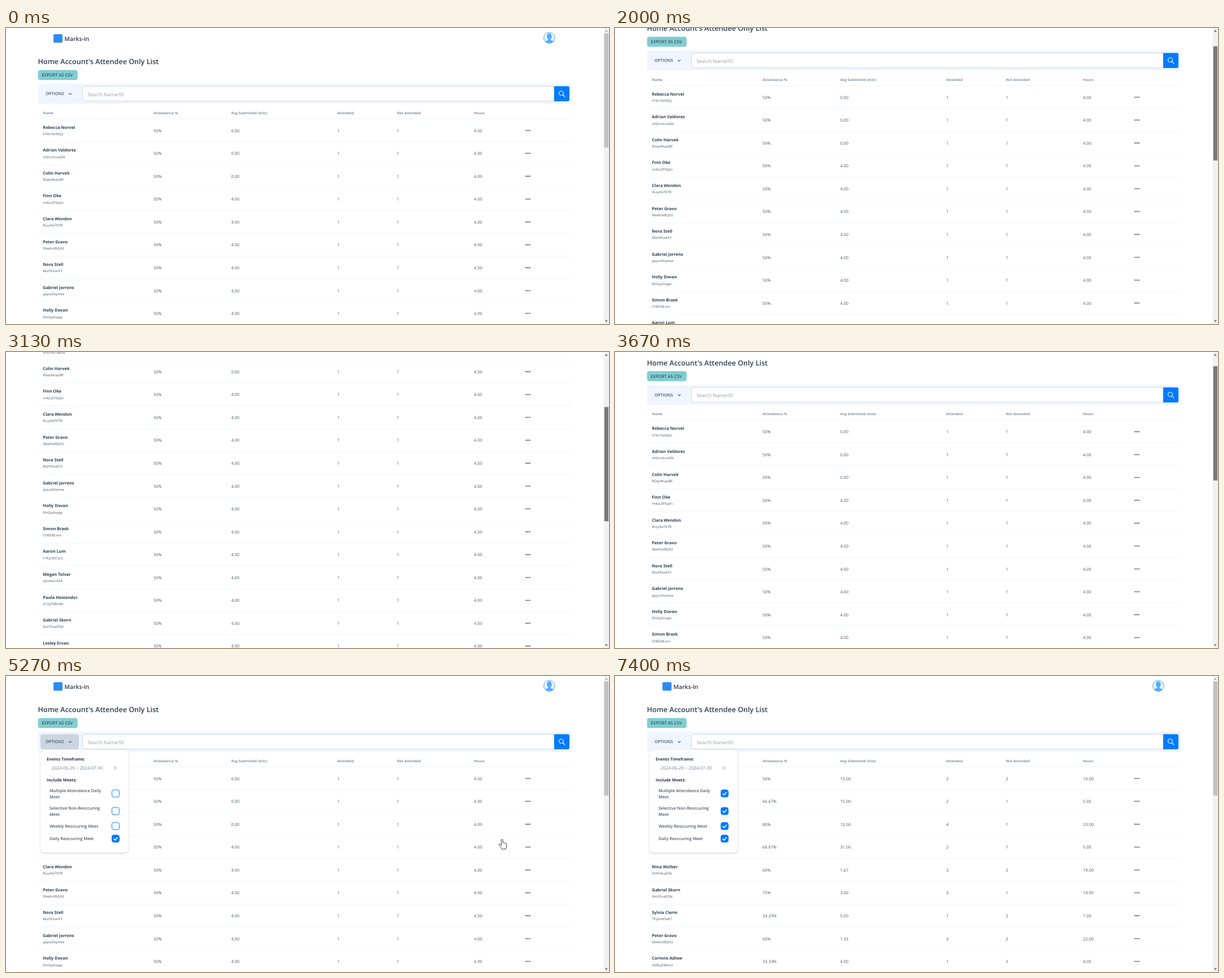
Animation of 1067x525 px, one loop 8 s. Source, as an HTML page:

```html
<!DOCTYPE html>
<html lang="en">
<head>
<meta charset="utf-8">
<title>Attendee list</title>
<style>
  html, body { margin: 0; width: 100%; height: 100%; overflow: hidden; background: #fff; }
  svg { display: block; width: 1067px; height: 525px; }
  text { font-family: "Open Sans", "Noto Sans", sans-serif; text-rendering: geometricPrecision; white-space: pre; }
  .brand { font-size: 10.3px; font-weight: 600; fill: #2d3748; }
  .title { font-size: 12.6px; font-weight: 600; fill: #2d3f55; }
  .export { font-size: 7.6px; font-weight: 500; fill: #1a2b3c; }
  .options { font-size: 7.4px; font-weight: 600; fill: #4a5568; }
  .search { font-size: 8.55px; fill: #959ba3; }
  .head { font-size: 6.25px; font-weight: 700; fill: #8492a6; }
  .name { font-size: 7.4px; font-weight: 700; fill: #2d3f55; }
  .id { font-size: 6px; fill: #4a5568; }
  .cell { font-size: 7.4px; fill: #4a5568; }
  .section { font-size: 7.3px; font-weight: 700; fill: #2d3748; }
  .date { font-size: 7.9px; fill: #718096; }
  .label { font-size: 7.3px; font-weight: 600; fill: #4a5568; }
  #panel > rect { filter: drop-shadow(0 1px 1.5px rgba(0, 0, 0, .22)); }
</style>
</head>
<body>
<svg viewBox="0 0 1067 525">
  <g id="page">
    <rect x="84" y="11" width="16" height="15" rx="2" fill="#2c8cf4"/>
    <text class="brand" x="103.6" y="22.7">Marks-In</text>
    <g id="avatar">
      <clipPath id="disc"><circle cx="961.4" cy="17.5" r="9.6"/></clipPath>
      <circle cx="961.4" cy="17.5" r="9.8" fill="#eaf4ff" stroke="#4da3fb"/>
      <path clip-path="url(#disc)" fill="#58abff" d="M957 14.5a4.4 5.2 0 0 1 8.8 0c0 2.6-1 4.2-2.2 5.2v1.5c2 1.2 5 1.5 6.4 3.6V29h-17.2v-4.2c1.4-2.1 4.4-2.4 6.4-3.6v-1.5c-1.2-1-2.2-2.6-2.2-5.2z"/>
    </g>
    <text class="title" x="56.6" y="64.4">Home Account's Attendee Only List</text>
    <rect x="56.7" y="74.4" width="70" height="17.8" rx="4" fill="#81cdd1"/>
    <text class="export" x="63.6" y="86.1">EXPORT AS CSV</text>
    <rect x="56.7" y="98.8" width="944.5" height="35.6" rx="4" fill="#f0f5ff"/>
    <rect id="hover" x="61" y="103.3" width="68" height="26.7" rx="4" fill="#cbd5e0"/>
    <text class="options" x="70" y="119.4">OPTIONS</text>
    <path d="M111.2 115.6l2.4 2.4 2.4-2.4" fill="none" stroke="#4a5568" stroke-width="1.1"/>
    <path d="M970.5 103.5H139.4a4 4 0 0 0-4 4v18a4 4 0 0 0 4 4H970.5z" fill="#fff" stroke="#cfd8e3"/>
    <text class="search" x="144.2" y="120.6">Search Name/ID</text>
    <path d="M970 103.2h24a3 3 0 0 1 3 3v20.8a3 3 0 0 1-3 3h-24z" fill="#007bff"/>
    <g fill="none" stroke="#fff" stroke-width="1.1" stroke-linecap="round">
      <circle cx="982.4" cy="115.6" r="3.9"/><path d="M985.3 118.5l3.5 3.5"/>
    </g>
    <g id="table"></g>
    <g id="panel">
      <rect x="61" y="131" width="155.8" height="182.6" rx="7" fill="#fff"/>
      <text class="section" x="72" y="149.6">Events Timeframe:</text>
      <text class="date" x="80.4" y="166.3">2024-06-29 ~ 2024-07-30</text>
      <path d="M190.6 160.4l5.6 5.6m0-5.6l-5.6 5.6" stroke="#718096" stroke-width=".7"/>
      <text class="section" x="72" y="187.2">Include Meets:</text>
      <g id="meets"></g>
    </g>
  </g>
  <rect x="1057.6" width="9.4" height="525" fill="#f1f1f1"/>
  <path id="up" d="M1060 6.4l2.3-2.8 2.3 2.8z"/>
  <path d="M1060 518.7l2.3 2.8 2.3-2.8z" fill="#505050"/>
  <rect id="thumb" x="1058.7" width="7.3" height="202.6"/>
  <g id="cursor" stroke="#222" stroke-width=".9" fill="#fff" stroke-linejoin="round">
    <path id="hand" d="M-1.6 1.2a1.4 1.4 0 0 1 2.8 0V6c.5-.8 2.2-.6 2.4.5.6-.7 2-.4 2.2.6.7-.5 1.9 0 1.9 1.2v4.2c0 1.9-1.3 2.6-1.3 4.5H-.8c0-1.7-1.7-2.6-2.6-4.3L-5.7 9.5c-.6-1.4.9-2.2 2-1.2l2.1 2z"/>
    <path id="arrow" d="M0 0v13.5l3.1-2.9 2.1 4.9 2.1-.9-2.1-4.8h4.2z"/>
  </g>
</svg>
<script>
const LOOP = 8000, TICK = LOOP / 120, ROW = 40.56;
const COLUMNS = [261, 398.4, 586, 691.5, 828];
const HEADINGS = ['Attendance %', 'Avg Submitted (min)', 'Attended', 'Not Attended', 'Hours'];

const people = `Rebecca Norvel,kT4n7w36QL
Adrian Valdorez,xH2cmLUaGN
Colin Harvek,RGeyWuqd8f
Finn Oke,m42vZP3q5n
Clara Wendon,4LuyheTR7B
Peter Gravo,9bwKsV8QH2
Nora Stell,B6zFKSodY3
Gabriel Jorrens,ppyuGXqmee
Holly Dovan,EhtGydnqqe
Simon Brask,ChBZ4JLvvo
Aaron Lum,Y7R2VDTSLK
Megan Tolvar,ypLwecnFe4
Paula Hestandor,d72yP9BsMh
Gabriel Skorn,Kxo55uaDQe
Lesley Ervan,zW8tq3LbHc
Nina Wolber,VnXh4uaZGk
Sylvia Clerm,TPyDnK5eR7
Corinne Adlow,hDRsyhR6m2`.split('\n').map(line => line.split(','));

// Table contents after each filter change: people order and cell values.
const stages = [
  { at: 0, order: people.map((_, i) => i),
    cells: people.map((_, i) => `50% ${i < 3 ? '0.00' : '4.00'} 1 1 4.00`) },
  { at: 6130, order: [0, 1, 2, 3, 13, 15, 5, 16, 8],
    cells: ['50% 15.00 1 1 5.00', '50% 15.00 1 1 4.00', '66.67% 15.50 2 1 9.00', '50% 31.00 1 1 4.00',
      '66.67% 3.00 2 1 8.00', '50% 1.67 1 1 5.00', '66.67% 1.33 2 1 8.00', '50% 5.00 1 1 1.00', '50% 4.00 1 1 4.00'] },
  { at: 6660, order: [0, 1, 2, 3, 13, 15, 5, 16, 8],
    cells: ['50% 15.00 2 2 10.00', '66.67% 15.00 2 1 5.00', '75% 15.50 3 1 18.00', '66.67% 31.00 2 1 5.00',
      '66.67% 3.00 2 1 9.00', '66.67% 1.67 2 1 14.00', '66.67% 1.33 2 1 17.00', '50% 5.00 1 1 1.00', '50% 4.00 1 1 4.00'] },
  { at: 7330, order: [0, 1, 2, 3, 15, 13, 16, 5, 17],
    cells: ['50% 15.00 2 2 10.00', '66.67% 15.00 2 1 5.00', '80% 15.50 4 1 23.00', '66.67% 31.00 2 1 5.00',
      '60% 1.67 3 2 19.00', '75% 3.00 3 1 14.00', '33.33% 5.00 1 2 1.00', '60% 1.33 3 2 22.00', '33.33% 4.00 1 2 4.00'] }
];

const meets = [
  { y: 208.3, lines: ['Multiple Attendance Daily', 'Meet'], checkedAt: 6000 },
  { y: 239.5, lines: ['Selective Non-Reoccuring', 'Meet'], checkedAt: 6530 },
  { y: 266.2, lines: ['Weekly Reoccuring Meet'], checkedAt: 7200 },
  { y: 288.4, lines: ['Daily Reoccuring Meet'], checkedAt: 0 }
];

// Keyframes: time, value
const scrollKeys = [[1470, 0], [1600, 4], [1670, 9], [2400, 119.6], [3130, 228], [3200, 231], [3670, 40.4], [3800, 6], [3870, 0]];
const hoverKeys = [[4870, 0], [5000, 1], [5300, 1], [5470, 0]];
const panelKeys = [[5000, 0], [5130, 1]];
const cursorX = [[4600, 1038], [4870, 925], [5130, 878], [5300, 878], [5670, 1000], [6070, 1000], [6330, 1004], [7200, 1004], [7400, 1075]];
const cursorY = [[4600, 498], [4870, 345], [5130, 290], [5300, 290], [5670, 415], [6070, 415], [6330, 458], [6600, 458], [6930, 501], [7200, 501], [7400, 505]];

const $ = id => document.getElementById(id);
const text = (cls, x, y, value) => `<text class="${cls}" x="${x}" y="${y}">${value}</text>`;
const within = (t, ...spans) => spans.some(([from, to]) => t >= from && t < to);

function sample(keys, t) {
  const next = keys.findIndex(key => key[0] > t);
  if (next === 0) return keys[0][1];
  if (next < 0) return keys[keys.length - 1][1];
  const [t0, a] = keys[next - 1], [t1, b] = keys[next];
  return a + (b - a) * (t - t0) / (t1 - t0);
}

function rowMarkup(stage, i) {
  const [name, id] = people[stage.order[i]], y = 161.3 + i * ROW;
  const cells = stage.cells[i].split(' ').map((value, c) => text('cell', COLUMNS[c], y + 23.3, value));
  const dots = [920.3, 923.5, 926.7].map(x => `<circle cx="${x}" cy="${y + 20.5}" r="1.05" fill="#2d3748"/>`);
  return `<path d="M56.7 ${y}H1001" stroke="#eff3f8" stroke-width=".8"/>` +
    text('name', 65.3, y + 17.5, name) + text('id', 65.3, y + 28.8, id) + cells.join('') + dots.join('');
}

const tableMarkup = stage => text('head', 65.3, 152.8, 'Name') +
  HEADINGS.map((label, i) => text('head', COLUMNS[i], 152.8, label)).join('') +
  stage.order.map((_, i) => rowMarkup(stage, i)).join('');

$('meets').innerHTML = meets.map(({ y, lines }) =>
  lines.map((line, i) => text('label', 77, y + 2.6 + (lines.length > 1 ? i * 11 - 5.4 : 0), line)).join('') +
  `<rect x="187.4" y="${y - 6.5}" width="13" height="13" rx="3.6" stroke="#0a7cff"/>
   <path d="M190.5 ${y + .2}l2.5 2.5 4.6-5" fill="none" stroke="#fff" stroke-width="1.5"/>`).join('');
const boxes = [...document.querySelectorAll('#meets rect')];

let shown;
function render(t) {
  const stage = stages.filter(s => s.at <= t).pop();
  if (stage !== shown) $('table').innerHTML = tableMarkup(shown = stage);

  const scroll = sample(scrollKeys, t);
  $('page').setAttribute('transform', `translate(0 ${-scroll})`);
  $('thumb').setAttribute('y', 9.6 + scroll / 2.59);
  $('thumb').setAttribute('fill', within(t, [1530, 4130]) ? '#787878' : within(t, [1070, 4270]) ? '#a8a8a8' : '#c1c1c1');
  $('up').setAttribute('fill', scroll > 0 ? '#505050' : '#a3a3a3');

  $('hover').setAttribute('opacity', sample(hoverKeys, t));
  $('panel').setAttribute('opacity', sample(panelKeys, t));
  boxes.forEach((box, i) => box.setAttribute('fill', t >= meets[i].checkedAt ? '#007bff' : '#fff'));

  const pointing = within(t, [4870, 5330], [5600, 6200], [6300, 6730], [6860, 7260]);
  $('cursor').setAttribute('visibility', within(t, [4600, 7400]) ? 'visible' : 'hidden');
  $('cursor').setAttribute('transform', `translate(${sample(cursorX, t)} ${sample(cursorY, t)})`);
  $('hand').setAttribute('display', pointing ? 'inline' : 'none');
  $('arrow').setAttribute('display', pointing ? 'none' : 'inline');
}

// The picture holds between ticks; tick times are rounded to 10 ms.
const start = performance.now();
function frame() {
  const t = (performance.now() - start) % LOOP;
  const tick = Math.floor((t + 4) / TICK);
  render(Math.round(tick * TICK / 10) * 10 % LOOP);
  requestAnimationFrame(frame);
}
frame();
</script>
</body>
</html>
```
